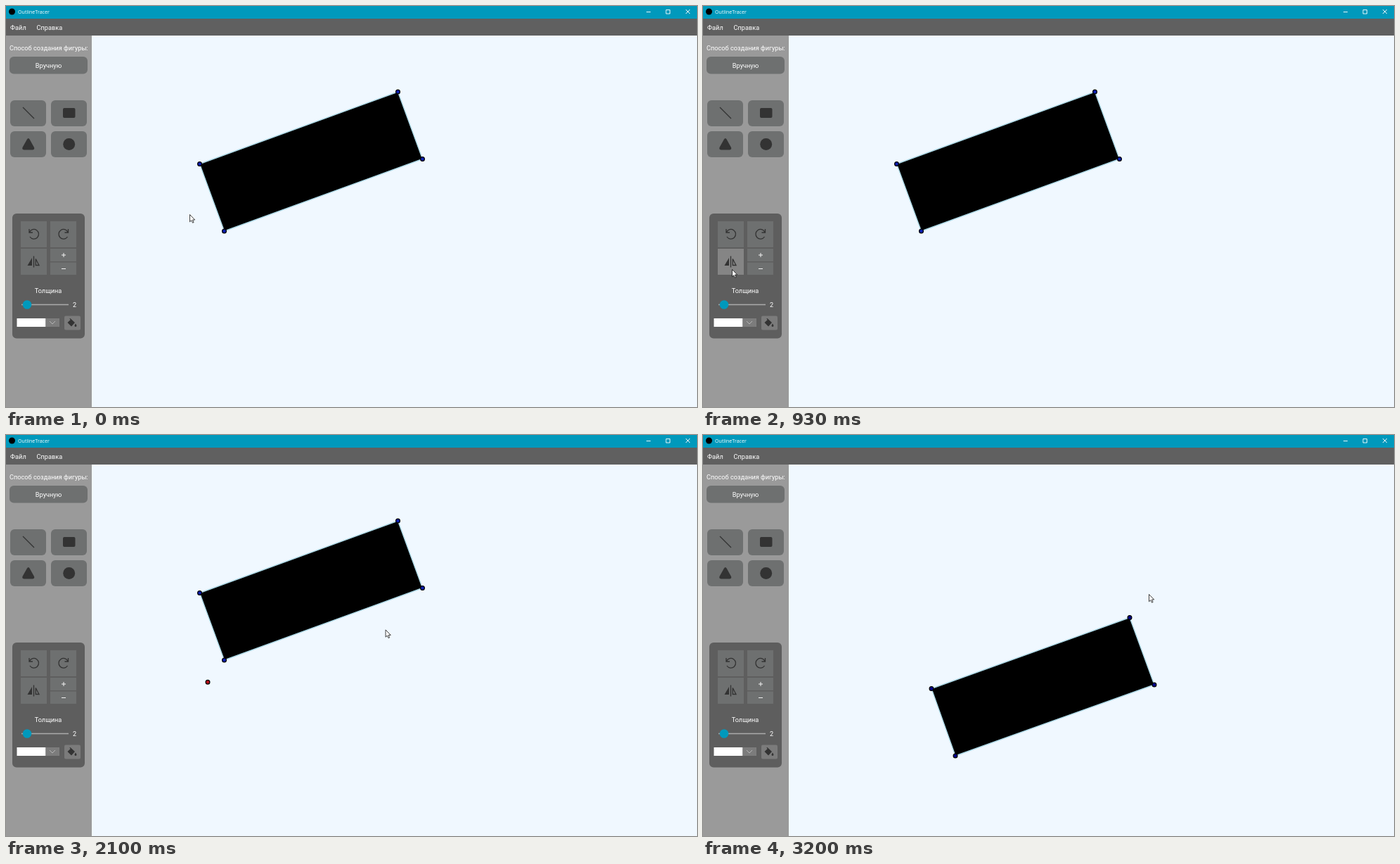
An HTML page that plays this animation: 983 px wide and 570 px high, repeating every 3.4 s.

```html
<!DOCTYPE html>
<html lang="ru">
<head>
<meta charset="utf-8">
<style>
  html, body { margin: 0; width: 100%; height: 100%; overflow: hidden; background: #f0f8ff; }
  svg { display: block; width: 983px; height: 570px; }
  text { font: 9.2px Roboto, sans-serif; fill: #fff; }
  .title { font: 7.1px "Open Sans", sans-serif; }
  .mid { text-anchor: middle; }
  .btn { fill: #6e7070; }
  .icon { fill: #333; }
  .line { fill: none; stroke: #333; stroke-width: 1.3; }
  .white { fill: none; stroke: #fff; stroke-width: .9; }
  .shape polygon { stroke: #add8e6; stroke-width: 1.4; }
  .shape circle { stroke: #000; stroke-width: 1.2; }
</style>
</head>
<body>
<svg viewBox="0 0 983 570">
  <rect width="983" height="18" fill="#0099bc"/>
  <circle cx="8.5" cy="8" r="4.5"/>
  <text class="title" x="17" y="11">OutlineTracer</text>
  <path class="white" d="M911 8.5h6M939 5.5h5.5v5.5h-5.5zM967 5l6 6m0-6l-6 6"/>
  <rect y="18" width="983" height="24" fill="#606060"/>
  <text x="6" y="34">Файл</text>
  <text x="43.5" y="34">Справка</text>

  <rect y="42" width="122" height="528" fill="#9a9a9a"/>
  <text x="5" y="63">Способ создания фигуры:</text>
  <rect class="btn" x="5" y="72" width="111" height="24.5" rx="6"/>
  <text class="mid" x="60.5" y="87.5">Вручную</text>

  <g class="btn">
    <rect x="6" y="134" width="51" height="37" rx="6"/>
    <rect x="64" y="134" width="51" height="37" rx="6"/>
    <rect x="6" y="178" width="51" height="37" rx="6"/>
    <rect x="64" y="178" width="51" height="37" rx="6"/>
  </g>
  <path class="line" d="M24 144l16 16"/>
  <rect class="icon" x="81" y="145" width="17.5" height="14" rx="2"/>
  <path class="icon" d="M30 189.5q1.8-3 3.6 0l6.4 11.5q1 3-2 3.5H25.500q-3-.5-2-3.500z"/>
  <circle class="icon" cx="89.700" cy="196.500" r="8.500"/>

  <rect x="9" y="295" width="103" height="177.500" rx="6" fill="#5e5e5e"/>
  <g class="btn">
    <rect x="21" y="306" width="37" height="37"/>
    <rect x="63" y="306" width="37" height="37"/>
    <rect id="flip" x="21" y="345" width="37" height="37"/>
    <rect x="63" y="345" width="37" height="18"/>
    <rect x="63" y="364.500" width="37" height="17.500"/>
  </g>
  <g id="turn">
    <path class="line" d="M33.500 321.500a6.800 6.800 0 1 1 .5 6.500M33 317v5h5"/>
  </g>
  <use href="#turn" transform="matrix(-1 0 0 1 121.500 0)"/>
  <path class="line" d="M39.500 355.500v16"/>
  <path class="icon" d="M37 358v11h-6.500z"/>
  <path class="line" d="M42.300 359.500v9h4.700z"/>
  <path class="white" d="M79 354h6m-3-3v6M79 373.500h6"/>

  <text class="mid" x="60" y="407.500">Толщина</text>
  <path d="M22 424.500h67" stroke="#aaa" stroke-width="1.300"/>
  <circle cx="30" cy="424.500" r="6.300" fill="#0099bc"/>
  <text x="95" y="428">2</text>
  <rect x="15.500" y="444" width="41" height="12" fill="#fff"/>
  <rect x="56.500" y="444" width="19.500" height="12" fill="#7c7c7c"/>
  <path class="white" d="M62 448l4 4 4-4" style="stroke:#bbb"/>
  <rect x="83" y="440.500" width="23" height="20" rx="2" fill="#7b7b7b"/>
  <path class="icon" d="M91.500 444l6.500 6-5 5.500-5.500-5.500 4.300-4-1.500-1.500zM99 451.500q3 4 0 4.500-3-.5 0-4.500z"/>

  <g id="before" class="shape" fill="#0a1fb0"></g>
  <g id="after" class="shape" fill="#00008b"></g>
  <path id="axis" d="M287 351L634 226.500" stroke="#000" stroke-width="1.300"/>
  <circle id="anchor" cx="287" cy="351.200" r="2.900" fill="#b80f1c" stroke="#000" stroke-width="1.200"/>

  <g id="tip">
    <rect x="41" y="387" width="104" height="17" rx="2" fill="#333" opacity=".14"/>
    <text x="46" y="398" opacity=".15" style="font-size:8.200px">Отразить по горизонтали</text>
  </g>
  <g id="pointer">
    <circle id="press" r="7.800" fill="#ffff40" opacity=".65"/>
    <path d="M.5.5v10.300l2.300-2.100 1.700 3.500 1.600-.7-1.600-3.500h3.200z" fill="#fff" stroke="#111" stroke-width=".8"/>
  </g>
</svg>
<script>
const LOOP = 3400;
const $ = id => document.getElementById(id);

// Redraw bursts: start, end, number of updates
const bursts = [[0, 0, 1], [70, 540, 8], [610, 1070, 8], [1140, 1560, 7],
                [1760, 2240, 8], [2310, 2580, 5], [2710, 2780, 2], [3200, 3200, 1]];

// Pointer path: time, x, y
const path = [[0, 261, 296], [540, 47, 376], [670, 41, 374], [930, 41, 374],
              [1070, 207, 381], [1420, 295, 363], [1560, 287, 351],
              [1760, 287, 351], [2240, 602, 258], [2580, 634, 226], [LOOP, 634, 226]];

function fillShape(id, points) {
  $(id).innerHTML = `<polygon points="${points.join(' ')}" fill="#000"/>` +
    points.map(([x, y]) => `<circle cx="${x}" cy="${y}" r="2.9"/>`).join('');
}
fillShape('before', [[275.5, 224.5], [557.5, 122], [592.5, 217.5], [310.5, 320]]);
fillShape('after', [[325, 360.5], [607, 259.5], [642, 355], [359, 456]]);

function stepTime(t) {
  const [start, end, count] = bursts.findLast(b => b[0] <= t);
  const gap = (end - start) / (count - 1 || 1);
  if (!gap) return start;
  return start + Math.min(count - 1, Math.floor((t - start + 5) / gap)) * gap;
}

function pointerAt(t) {
  const i = Math.max(1, path.findIndex(p => p[0] >= t));
  const [t0, x0, y0] = path[i - 1], [t1, x1, y1] = path[i];
  const u = (t - t0) / (t1 - t0), e = u * u * (3 - 2 * u);
  return [x0 + (x1 - x0) * e, y0 + (y1 - y0) * e];
}

const show = (id, on) => { $(id).style.visibility = on ? 'visible' : 'hidden'; };
const within = (t, from, to) => t >= from - 5 && t < to - 5;

function draw(now) {
  const t = stepTime(now % LOOP);
  const [x, y] = pointerAt(t);
  $('pointer').setAttribute('transform', `translate(${x} ${y})`);
  $('flip').style.fill = x >= 21 && x <= 58 && y >= 345 && y <= 382 ? '#858585' : '';
  show('press', within(t, 740, 800) || within(t, 1760, 1825) || within(t, 2710, 2780));
  show('tip', within(t, 930, 1000));
  show('anchor', within(t, 1760, 2710));
  show('axis', within(t, 2710, 3200));
  show('before', t < 2705);
  show('after', t >= 2705);
}

const origin = performance.now();
function tick() {
  draw(performance.now() - origin);
  requestAnimationFrame(tick);
}
tick();
</script>
</body>
</html>
```
